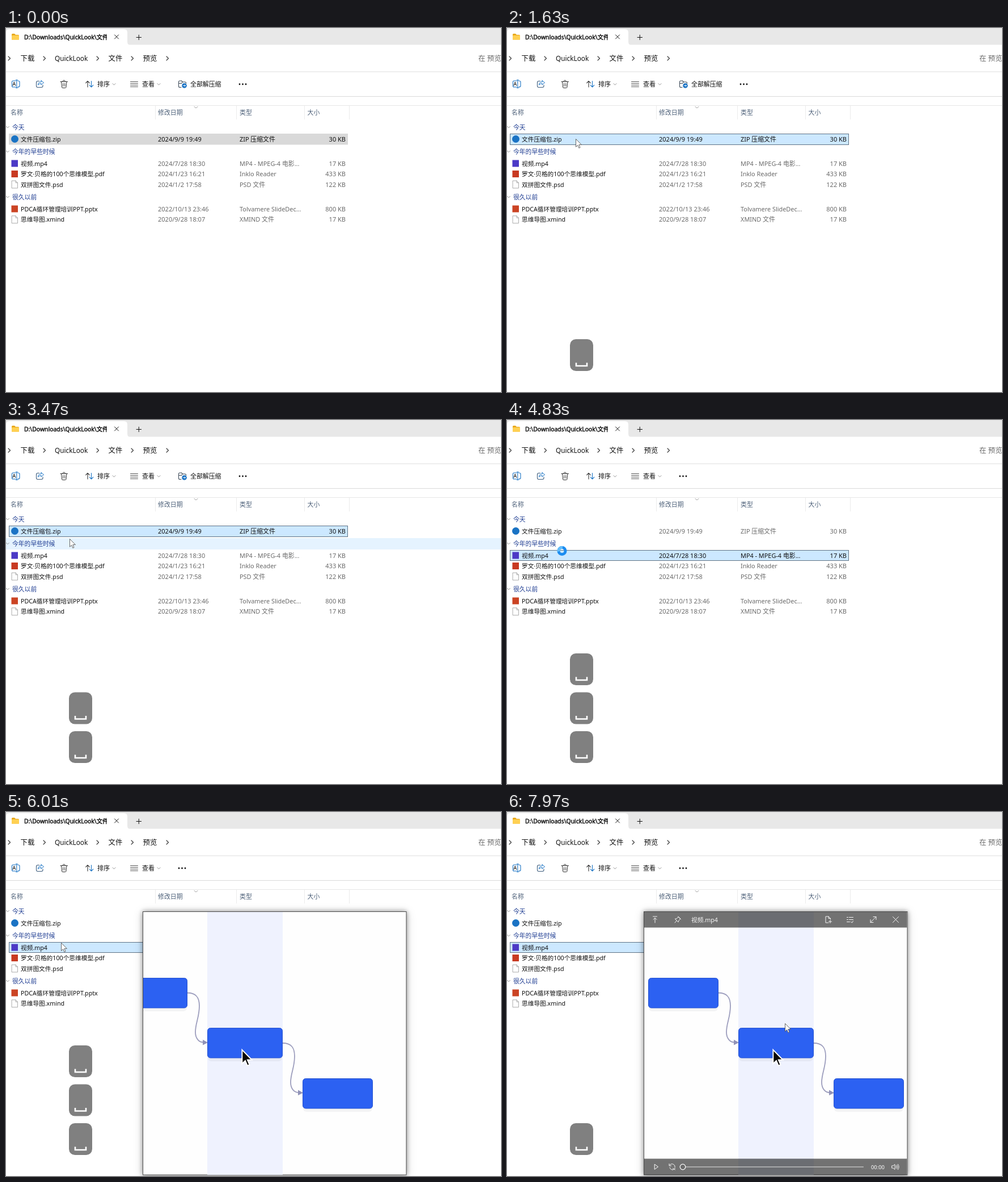
Animation of 873x641 px, one loop 8000 ms. Source, as an HTML page:

```html
<!DOCTYPE html>
<html lang="zh-CN">
<head>
<meta charset="utf-8">
<title>文件预览</title>
<style>
html, body { margin: 0; width: 100%; height: 100%; overflow: hidden; background: #fff; }
svg { display: block; width: 873px; height: 641px; }
text { font-family: "Noto Sans", "Noto Sans CJK SC", "Noto Sans CJK", sans-serif; white-space: pre; }
.line { fill: none; stroke-linecap: round; stroke-linejoin: round; }
.shadow { filter: drop-shadow(0 0 4px rgba(0,0,0,.4)) drop-shadow(0 2px 8px rgba(0,0,0,.16)); }
</style>
</head>
<body>
<svg id="stage" viewBox="0 0 873 641" xmlns="http://www.w3.org/2000/svg"></svg>
<script>
const INK = '#111', GREY = '#6a6a6a', BLUE = '#1a73c4';
const ARROW = 'M.5 .5V14.4l3.2-3 2.1 5 2.2-.9-2.1-4.9h4.5z';

const text = (x, y, s, fill = INK, size = 11, extra = '') =>
  `<text x="${x}" y="${y}" fill="${fill}" font-size="${size}" ${extra}>${s}</text>`;
const rect = (x, y, w, h, fill, extra = '') =>
  `<rect x="${x}" y="${y}" width="${w}" height="${h}" fill="${fill}" ${extra}/>`;
const line = (d, stroke = INK, width = 1, extra = '') =>
  `<path class="line" d="${d}" stroke="${stroke}" stroke-width="${width}" ${extra}/>`;
const group = (id, body, extra = '') => `<g id="${id}" ${extra}>${body}</g>`;
const right = (x, y) => line(`M${x - 2} ${y - 3.5}l3.5 3.5-3.5 3.5`, '#333', 1.1);
const down = (x, y, c = '#888') => line(`M${x - 2.5} ${y - 1.2}l2.5 2.5 2.5-2.5`, c, .9);

// name, date, type, size, centre line, icon
const files = [
  ['文件压缩包.zip', '2024/9/9 19:49', 'ZIP 压缩文件', '30 KB', 195.5, 'disc'],
  ['视频.mp4', '2024/7/28 18:30', 'MP4 - MPEG-4 电影...', '17 KB', 238.5, '#4b39c6'],
  ['罗文·贝格的100个思维模型.pdf', '2024/1/23 16:21', 'Inklo Reader', '433 KB', 257, '#c83a22'],
  ['双拼图文件.psd', '2024/1/2 17:58', 'PSD 文件', '122 KB', 275.5, 'page'],
  ['PDCA循环管理培训PPT.pptx', '2022/10/13 23:46', 'Tolvamere SlideDec...', '800 KB', 318.5, '#cb4424'],
  ['思维导图.xmind', '2020/9/28 18:07', 'XMIND 文件', '17 KB', 337.3, 'page']
];
const groups = [['今天', 174.5], ['今年的早些时候', 217.5], ['很久以前', 297.5]];

function icon(kind, y) {
  if (kind === 'disc') return `<circle cx="15.5" cy="${y}" r="6.5" fill="${BLUE}"/>`;
  if (kind === 'page') return line(`M10.5 ${y - 6.5}h6.5l3.5 3.5v9.5h-10zM17 ${y - 6.5}v3.5h3.5`, '#a2a2a2', .9);
  return rect(9.5, y - 6, 11.5, 12, kind);
}

function fileRow([name, date, type, size, y, kind], i) {
  const b = y + 4;
  return icon(kind, y) + text(26, b, name, INK, 10.7) +
    `<g id="info${i}" fill="${GREY}">` + text(268, b, date, 'inherit') +
    text(412, b, type, 'inherit', 10.9) +
    text(599, b, size, 'inherit', 11, 'text-anchor="end"') + '</g>';
}

const dots = x => [0, 5.5, 11].map(d => `<circle cx="${x + d}" cy="99" r="1.4" fill="${INK}"/>`).join('');

const topBar =
  rect(0, 0, 873, 29.5, '#e8e8e8') +
  '<path d="M0 30V8q0-6 6-6h202q6 0 6 6v16q0 6 5 6z" fill="#fff"/>' +
  '<path d="M10 11.5q0-1.5 1.5-1.5h3.5l2 2h4.5q1.5 0 1.5 1.5v7h-13z" fill="#e8a91d"/>' +
  rect(10, 13, 13, 7.8, '#ffd052', 'rx="1"') +
  '<clipPath id="tab"><path d="M30 5h148v22H30z"/></clipPath>' +
  text(32, 20, 'D:\\Downloads\\QuickLook\\文件', INK, 10.4, `clip-path="url(#tab)" stroke="${INK}" stroke-width=".45"`) +
  line('M191.5 12l7 7m0-7l-7 7M230 16.5h8.5m-4.25-4.25v8.5') +
  [6, 68, 162, 223, 285].map(x => right(x, 53.5)).join('') +
  [[25.5, '下载'], [86, 'QuickLook', 11.8], [180.5, '文件'], [241.5, '预览']]
    .map(([x, s, n = 12.4]) => text(x, 57.8, s, INK, n)).join('') +
  text(833, 58, '在 预览', GREY, 12.4) +
  rect(0, 76.5, 873, 1, '#dedede') + rect(0, 120, 873, 1, '#d9d9d9') + rect(0, 136, 873, 1, '#e6e6e6');

const toolbar =
  line('M17 93h-4.5q-2 0-2 2v7q0 2 2 2H17M20.5 93q3.5 0 3.5 2v7q0 2-3.5 2M17.3 91.5h3m-1.5 0v14m-1.5 0h3', BLUE, 1.1) +
  line('M12 101.5l2.3-6.5 2.3 6.5m-3.8-2.2h3', INK, .9) +
  line('M58.5 93.5h-2.5q-2.5 0-2.5 2.5v6q0 2.5 2.5 2.5h6.5q2.5 0 2.5-2.5v-1.5', '#3d5c7c', 1.1) +
  line('M62 92.5l4.5 3.8-4.5 3.7v-2.3q-4 0-5.5 2.8 0-5.5 5.5-5.8z', BLUE) +
  line('M96 94.5h12.5M100 94.5q0-2.5 2.2-2.5t2.2 2.5M97.5 94.5l1 9.5q.2 1.5 1.6 1.5h4.3q1.4 0 1.6-1.5l1-9.5M100.8 97.5v5m3-5v5', '#333') +
  line('M144 104V93.5l-3.3 3.3m3.3-3.3l3.3 3.3', '#333', 1.1) +
  line('M150.5 93.5V104l-3.3-3.3m3.3 3.3l3.3-3.3', BLUE, 1.1) +
  text(161, 103.2, '排序') + down(190.5, 99) +
  line('M219.5 94.5h13m-13 3h13m-13 3h13m-13 3h13', '#444', .9) +
  text(240, 103.2, '查看') + down(269.5, 99) +
  group('extract',
    line('M309 104.5h-2.5q-2 0-2-2V95q0-2 2-2h3l2 2h4q2 0 2 2v.5M304.5 97.5h5l2-2.5', '#3c4a58', 1.1) +
    `<circle cx="314.5" cy="101.5" r="4.3" fill="${BLUE}"/>` +
    line('M312.5 101.5h4m-1.5-1.5l1.5 1.5-1.5 1.5', '#fff', .9) +
    text(325, 103.2, '全部解压缩', INK, 10.9) + dots(412)) +
  group('short', dots(305));

const columns =
  [263, 406, 526, 605].map(x => rect(x, 137, 1, 24, '#ebebeb')).join('') +
  [[8, '名称'], [268, '修改日期'], [412, '类型'], [531.5, '大小']]
    .map(([x, s]) => text(x, 153, s, '#4d6079', 10.9)).join('') +
  line('M332 138.5l3 2.5 3-2.5', '#999', .9);

const list =
  rect(0, 0, 0, 20, '#e5f3ff', 'id="hover"') +
  rect(5, 186, 598, 19.5, '#d9d9d9', 'id="dull"') +
  rect(5.5, 186.5, 597, 19, '#cce8ff', 'id="chosen" stroke="#5f7386"') +
  groups.map(([s, y]) => down(3, y) + text(11, y + 4, s, '#1f3d92', 10.8)).join('') +
  files.map(fileRow).join('');

// Title strip shared by both preview windows
function titleStrip(l, r, y, name, c) {
  const at = (x, d) => line(d, c, 1, `transform="translate(${x} ${y})"`);
  return at(l + 20, 'M-3.5-5.5h7M0 5.5V-3m-3 3l3-3 3 3') +
    at(l + 60, 'M-5 5.5l3.5-4M-4.5-1l5.5 5.5 1-3 3-3L1.5-5l-3 3zM.5-5.5l5 5') +
    text(l + 84, y + 4.2, name, c, 10.7) +
    at(r - 140, 'M1 5.5h-5v-11h5l3.5 3.5v1.5M1-5.5V-2h3.5M4 1v5m-2.5-2.5h5') +
    at(r - 101, 'M-5.5-4h2m2 0h7M-5.5 0h2m2 0h7M-5.5 4h5m2 0l2 1.5 2-3') +
    at(r - 60, 'M0-5h5v5M5-5L-5 5M-5 0v5h5') +
    at(r - 20.5, 'M-5-5L5 5M5-5L-5 5');
}

const archive = group('archive',
  rect(123.5, 218.5, 701, 378, '#fff', 'class="shadow" stroke="#777"') +
  rect(124, 219, 700, 28, '#f1f1f1') + titleStrip(123, 825, 232.5, '文件压缩包.zip', '#333'));

const block = (x, y, w) =>
  rect(x + 1, y + 5, w - 2, 54, '#000', 'rx="6" opacity=".04"') +
  rect(x + .5, y + .5, w - 1, 52.5, '#2c61f2', 'rx="5" stroke="#2552cf"');
const link = (x, y) =>
  line(`M${x} ${y}c16 0 21 9 21 23 0 20-7 30-7 46 0 11 6 18 14 18`, '#9c9dbd', 1.8) +
  `<path d="M${x + 27} ${y + 82.5}l9 5-9 4.5z" fill="#9193b8"/>`;

const scene = group('scene',
  rect(408, 176, 133, 463, '#eff2fe') + link(373, 318.5) + link(541, 407) +
  block(249, 292, 124) + block(408, 380, 133) + block(576, 469, 124) +
  `<path d="${ARROW}" transform="translate(468.5 418) scale(1.75)" fill="#080808" stroke="#fff" stroke-width="1.1"/>`);

const controls = group('controls',
  rect(242, 176, 463.5, 27.5, '#000', 'opacity=".55"') +
  rect(242, 610.5, 463.5, 28.5, '#000', 'opacity=".55"') +
  titleStrip(241, 706, 189.5, '视频.mp4', '#f4f4f4') +
  line('M261 621v8m4-8v8', '#fff', 1, 'id="pause"') +
  line('M260.5 620.5l6 4.3-6 4.3z', '#fff', 1, 'id="play"') +
  line('M287 621.5q5-4.5 9 1.5v3M286 619.5v3.5h3.5M287 626q1.5 4.5 5.5 4', '#f4f4f4') +
  line('M292.5 627.5l4 2.5m-4 0l4-2.5', '#f4f4f4') +
  line('M315 625h313.5', '#e4e4e4') +
  '<circle id="knob" cy="625" r="4.8" fill="#6b6b6b" stroke="#fff" stroke-width="1.2"/>' +
  text(642, 628.8, '00:00', '#fff', 9.4, 'id="clock"') +
  line('M679 623h2l3-2.5v9l-3-2.5h-2zM686 623q1.5 2 0 4m1.8-5.5q2.7 3.5 0 7m1.7-8.3q3.5 4.8 0 9.6', '#fff', .9));

const video = group('video',
  rect(241.5, 175.5, 464.5, 463.5, '#fefefe', 'class="shadow" stroke="#4a4a4a"') +
  '<clipPath id="screen"><path d="M242 176h463.5v463H242z"/></clipPath>' +
  `<g clip-path="url(#screen)">${scene}${controls}</g>`);

const keyY = [548, 479.5, 411];
const keys = keyY.map((y, i) => group('key' + i,
  rect(111, y, 41, 56, '#808080', 'rx="10.5"') +
  `<path d="M122 ${y + 41.5}v5.5h19v-5.5" fill="none" stroke="#fff" stroke-width="2.6"/>`)).join('');

const pointer =
  group('spin', '<circle r="6" fill="none" stroke="#1c8cf0" stroke-width="5"/>' +
    '<path d="M-5.9 1A6 6 0 0 1 1-5.9" fill="none" stroke="#62bdfb" stroke-width="5"/>') +
  group('cursor', `<path d="${ARROW}" fill="#fff" stroke="#555" stroke-width=".9"/>`);

document.getElementById('stage').innerHTML =
  rect(0, 0, 873, 641, '#fff') + topBar + toolbar + columns + list + archive + video + keys + pointer;

const el = {};
document.querySelectorAll('[id]').forEach(n => el[n.id] = n);

// Steps: [time, value, ...], eased between neighbours
const pathSteps = [[100, 430, 632], [830, 124, 194], [890, 124, 194], [970, 121, 195], [3300, 121, 195],
  [3470, 112, 209], [3840, 97, 230], [6030, 97, 230], [6420, 492, 466], [6580, 492, 466],
  [6860, 492, 620], [7300, 492, 620], [7930, 490, 372]];
const panSteps = [[5690, 0], [6000, -53], [6330, -53], [6800, 53], [7340, 53], [7800, 0]];
const keyFades = [[[9000, 1]], [[7780, 1], [7940, 0]], [[6600, 1], [6820, 0]]];
const keyTimes = [1630, 2850, 4740];
const CLICK = 4070, START = 5379, LENGTH = 2551;

function at(steps, t) {
  const i = steps.findIndex(s => s[0] > t);
  if (i < 0) return steps[steps.length - 1].slice(1);
  if (i === 0) return steps[0].slice(1);
  const a = steps[i - 1], b = steps[i];
  const p = (t - a[0]) / (b[0] - a[0]), e = p * p * (3 - 2 * p);
  return a.slice(1).map((v, k) => v + (b[k + 1] - v) * e);
}
const fade = (id, v) => { el[id].style.opacity = v; };
const show = (id, on) => { el[id].style.display = on ? '' : 'none'; };
const move = (id, x, y, more = '') => el[id].setAttribute('transform', `translate(${x} ${y}) ${more}`);
const set = (id, o) => { for (const k in o) el[id].setAttribute(k, o[k]); };

function hover(t, x, y) {
  const covered = t > 5020 && x > 241;
  const head = groups.find(g => Math.abs(g[1] + .5 - y) < 10);
  const file = files.find(f => Math.abs(f[4] - y) < 9.4);
  const on = t >= 120 && !covered && (head || (file && x < 603));
  show('hover', on);
  if (!on) return;
  set('hover', head ? { x: 0, y: head[1] - 9.5, width: 873, height: 20 }
                    : { x: 5, y: file[4] - 9.5, width: 598, height: 19 });
}

function draw(t) {
  const [x, y] = at(pathSteps, t);
  const busy = t >= 4740 && t < 5290;
  hover(t, x, y);
  show('cursor', t >= 120 && !busy);
  move('cursor', x, y);
  show('spin', busy);
  move('spin', 97, 230.5, `rotate(${at([[4740, -30], [4830, 0], [5000, 0], [5300, 150]], t)[0]})`);

  const active = t < CLICK ? 0 : 1;
  show('dull', t < 880);
  show('chosen', t >= 880);
  set('chosen', { y: active ? 229.5 : 186.5, height: active ? 18 : 19 });
  files.forEach((f, i) => set('info' + i, { fill: i === active ? INK : GREY }));
  show('extract', t < 4590);
  show('short', t >= 4590);

  show('archive', t >= 1860 && t < 2900);
  fade('archive', at([[2830, 1], [2900, 0]], t)[0]);
  keyTimes.forEach((k, i) => {
    show('key' + i, t >= k);
    fade('key' + i, at(keyFades[i], t)[0]);
  });

  show('video', t >= 5000);
  fade('video', at([[4980, 0], [5110, 1]], t)[0]);
  fade('scene', at([[5100, 0], [5290, 1]], t)[0]);
  move('scene', at(panSteps, t)[0], 0);
  fade('controls', at([[6190, 0], [6400, 1]], t)[0]);

  const p = (t - START) / LENGTH, done = p < 0 || p >= 1;
  set('knob', { cx: 310 + (done ? 0 : p * 314) });
  el.clock.textContent = '00:0' + (done ? 0 : Math.floor(p * LENGTH / 1000));
  show('play', done);
  show('pause', !done);
}

function tick() {
  draw(performance.now() % 8000);
  requestAnimationFrame(tick);
}
tick();
</script>
</body>
</html>
```
